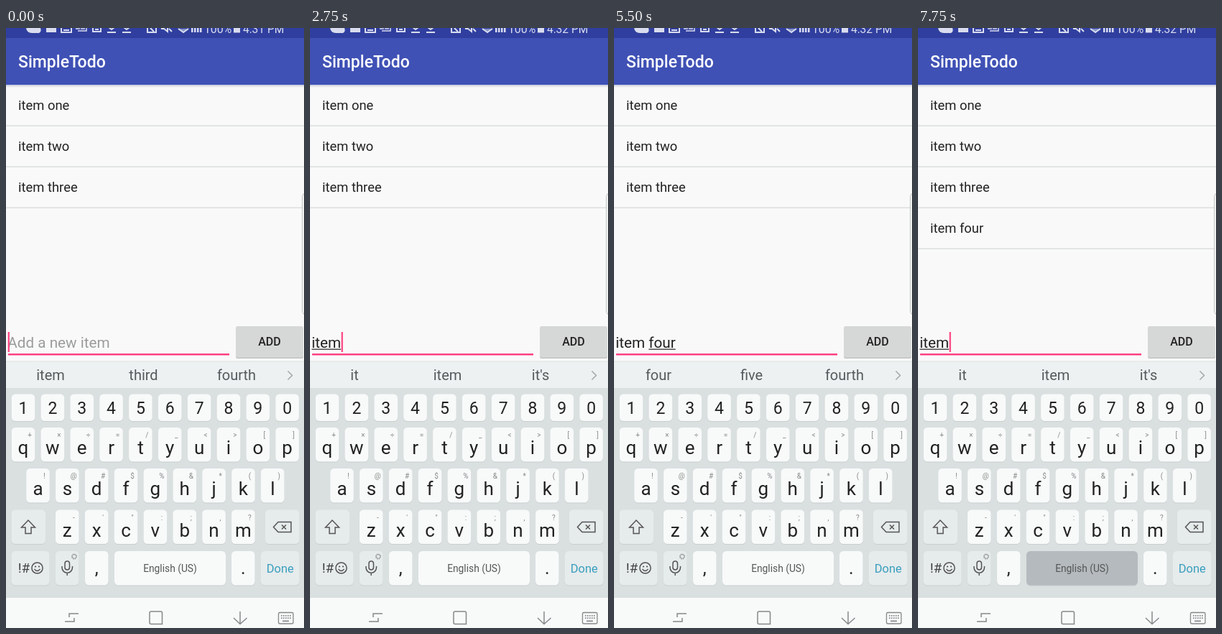
These frames come from a looping animation (415 by 835 pixels, 8 s). An HTML page:

```html
<!DOCTYPE html>
<html lang="en">
<head>
<meta charset="utf-8">
<title>Todo list</title>
<style>
html, body { margin: 0; width: 100%; height: 100%; overflow: hidden; background: #f9f9f9; }
svg { display: block; font-family: Roboto, "Noto Sans", sans-serif; }
text { white-space: pre; }
</style>
</head>
<body>
<svg id="stage" width="415" height="835" viewBox="0 0 415 835"></svg>
<script>
const STEP = 250, LOOP = 8000;
const INK = '#222', PITCH = 40.85;
const FIELD_FONT = 20.7, FIELD_X = 2.3;
const stage = document.getElementById('stage');
const pen = document.createElement('canvas').getContext('2d');

const esc = s => s.replace(/&/g, '&amp;').replace(/</g, '&lt;');
const rect = (x, y, w, h, fill, r = 0, more = '') =>
  `<rect x="${x}" y="${y}" width="${w}" height="${h}" rx="${r}" fill="${fill}" ${more}/>`;
const text = (s, x, y, size, fill = INK, anchor = 'middle', weight = 400) =>
  `<text x="${x}" y="${y}" font-size="${size}" fill="${fill}" text-anchor="${anchor}" font-weight="${weight}">${esc(s)}</text>`;
const line = (d, color, width = 1.5, fill = 'none') =>
  `<path d="${d}" stroke="${color}" stroke-width="${width}" fill="${fill}"/>`;
const circle = (x, y, r, fill, more = '') =>
  `<circle cx="${x}" cy="${y}" r="${r}" fill="${fill}" ${more}/>`;

function fieldWidth(s) {
  pen.font = `${FIELD_FONT}px Roboto, "Noto Sans", sans-serif`;
  return pen.measureText(s).width;
}

// Each entry: [time, properties that change from then on]
const START = 'item third fourth', PREFIX = "it item it's", NUMBERS = 'three four five';
const script = [
  [0, { typed: '', caret: 1, key: '', words: START, clock: '4:31 PM', rows: 3, add: 0 }],
  [250, { caret: 0 }],
  [750, { caret: 1 }],
  [1250, { key: 'i' }],
  [1500, { typed: 'i', key: 't' }],
  [1750, { typed: 'it', key: 'e', words: PREFIX }],
  [2000, { typed: 'ite', key: 'm', clock: '4:32 PM' }],
  [2250, { typed: 'item', key: '' }],
  [3000, { key: ' ' }],
  [3250, { typed: 'item ', key: 'f', words: NUMBERS }],
  [3500, { typed: 'item f', key: 'o' }],
  [3750, { typed: 'item fo', key: '' }],
  [4000, { typed: 'item fou', key: 'r' }],
  [4250, { typed: 'item four', key: '' }],
  [4500, { words: 'four five fourth' }],
  [5000, { caret: 0 }],
  [5750, { add: 1 }],
  [6000, { typed: '', caret: 1, add: 0, rows: 4, words: START }],
  [6500, { key: 'i' }],
  [6750, { typed: 'i', key: 't' }],
  [7000, { typed: 'it', key: 'e', words: PREFIX }],
  [7250, { typed: 'ite', key: 'm' }],
  [7500, { typed: 'item', key: '' }],
  [7750, { key: ' ' }]
];
const stateAt = t => Object.assign({}, ...script.filter(e => e[0] <= t).map(e => e[1]));

function statusBar(clock) {
  const c = '#d9dcee';
  return rect(0, 0, 415, 14, '#303f9f') +
    line('M28 0Q29 7 36 7H46Q50 5 48 0Z', c, 0, c) +
    rect(56, 0, 14, 6, c) +
    line('M77 0V6H91V0M80 3H88', c, 2) +
    line('M97 1H103M100 4H112V0M104 1H110', c, 1.5) +
    line('M121 0V5H132V0M124 2H129', c, 2) +
    [147, 168].map(x => line(`M${x - 4} -1L${x} 2L${x + 4} -1M${x - 6} 6H${x + 6}`, c, 2)).join('') +
    line('M197 0V6H209V0M201 0L206 5', c, 2) +
    line('M216 1H220L225 5V0M227 1L231 5', c, 2) +
    line('M240 1L247 6L254 1', c, 2, '#8790c8') +
    [258, 262, 266, 270].map(x => rect(x, 0, 2.5, 6, c)).join('') +
    text('100%', 295, 6.5, 16, c) + rect(317, 0, 9, 6.5, c) +
    text(clock, 330, 6.5, 15.6, c, 'start');
}

function list(count) {
  return ['one', 'two', 'three', 'four'].slice(0, count).map((n, i) =>
    text('item ' + n, 17, 114 + 57 * i, 18.4, INK, 'start') +
    rect(0, 135.5 + 57 * i, 415, 1.2, '#d5d7d7')).join('');
}

function entry({ typed, caret, add }) {
  const end = FIELD_X + fieldWidth(typed);
  const wordStart = FIELD_X + fieldWidth(typed.slice(0, typed.lastIndexOf(' ') + 1));
  return (typed
      ? text(typed, FIELD_X, 445, FIELD_FONT, INK, 'start')
      : text('Add a new item', FIELD_X, 445, FIELD_FONT, '#9b9c9c', 'start')) +
    rect(wordStart, 446.5, end - wordStart, 1.2, INK) +
    rect(3, 453, 308, 2.5, '#ff4081') +
    (caret ? rect(end + 0.4, 423, 2.2, 28, '#ff4081') : '') +
    rect(320, 416, 94, 44, '#c2c3c3', 2.5) +
    rect(320, 415, 94, 43.5, add ? '#b4b5b5' : '#d6d7d7', 2.5) +
    text('ADD', 367, 442, 16.1, INK, 'middle', 500);
}

const letterRows = [
  ['qwertyuiop', '+×÷=/_<>[]', 24, 556],
  ['asdfghjkl', '!@#$%&*()', 44.5, 613],
  ['zxcvbnm', '-\'":;,?', 85.3, 670.5]
];

function key(x, y, w, h, fill = '#f8fafa') {
  return rect(x, y + 1, w, h, '#c9cecf', 5.5) + rect(x, y, w, h, fill, 5.5);
}

function letters(pressed) {
  let keys = '', popup = '';
  for (const [chars, hints, x0, y] of letterRows)
    [...chars].forEach((ch, i) => {
      const x = x0 + PITCH * i, down = ch === pressed;
      keys += key(x - 16.3, y, 32.6, 47.5, down ? '#b4babd' : undefined) +
        text(ch, x, y + 37, 26) + text(hints[i], x + 9, y + 14, 10, '#888');
      if (down) popup =
        rect(x - 31, y - 94.5, 62, 80, '#cfd4d5', 12) +
        rect(x - 30.2, y - 95, 60.4, 79, '#f9fbfb', 11.5) +
        text(ch, x, y - 39, 41, INK, 'middle', 500);
    });
  return keys + popup;
}

function functionKeys(pressed) {
  const soft = '#e6ebec', c = '#555';
  return key(7.5, 670.5, 47.5, 47.5, soft) +
    line('M31 685L21.5 695H27V703.5H35V695H40.5Z', c) +
    key(361, 670.5, 47.5, 47.5, soft) +
    line('M372.5 694.5L379 687.5H397V701.5H379ZM384 691.5L390 697.5M390 691.5L384 697.5', c) +
    key(7.5, 728, 53, 47.5, soft) + text('!#', 25, 758, 19, '#444') +
    circle(43.5, 751.5, 7.6, 'none', `stroke="${c}" stroke-width="1.5"`) +
    circle(41, 749.5, 1.1, c) + circle(46, 749.5, 1.1, c) + line('M39.5 753Q43.5 758 47.5 753', c, 1.3) +
    key(69, 728, 32.5, 47.5, soft) +
    rect(82, 742, 6.5, 12, 'none', 3.2, `stroke="${c}" stroke-width="1.5"`) +
    line('M78 749V751A7.2 7.2 0 0 0 92.5 751V749M85.2 758V762', c) +
    circle(95, 735.5, 3, 'none', 'stroke="#999" stroke-width="2" stroke-dasharray="1.6 .7"') +
    key(110, 728, 32.5, 47.5) + text(',', 126.3, 760, 25) +
    key(151, 728, 155, 47.5, pressed === ' ' ? '#b4babd' : undefined) +
    text('English (US)', 228.5, 757, 13.8, '#555') +
    key(314, 728, 32.5, 47.5) + text('.', 330.3, 760, 25) +
    key(355, 728, 53.5, 47.5, soft) + text('Done', 381.7, 758, 16.5, '#399fbe');
}

function navBar() {
  const c = '#858989';
  let dots = '';
  for (let i = 0; i < 10; i++) dots += rect(383 + i % 5 * 3, 817 + 3.4 * (i / 5 | 0), 1.7, 1.7, c);
  return rect(0, 793, 415, 42, '#f8f9f9') +
    line('M88 820V815H101M82 826H95V821', c) +
    line('M209 829.5H202Q200 829.5 200 827.5V814Q200 812 202 812H215.5Q217.5 812 217.5 814V829.5H209', c) +
    line('M326 812V829.5M317 821L326 829.5L335.5 821', c) +
    rect(379.5, 813.5, 20.5, 15.5, 'none', 2, `stroke="${c}" stroke-width="1.3"`) +
    dots + rect(385, 824.5, 9, 1.7, c);
}

function keyboard({ words, key: pressed }) {
  return rect(0, 463.5, 415, 38, '#edf1f2') + rect(0, 463.5, 415, 1, '#dfe3e4') +
    words.split(' ').map((w, i) => text(w, 62 + 129.5 * i, 490, 20, '#555b5d')).join('') +
    line('M392.5 477.5L398.5 483.5L392.5 489.5', '#a3a8aa') +
    rect(0, 501, 415, 292, '#dadfe0') +
    [...'1234567890'].map((d, i) => {
      const x = 24 + PITCH * i;
      return key(x - 16.3, 509.5, 32.6, 37.5) + text(d, x, 537, 23);
    }).join('') +
    functionKeys(pressed) + letters(pressed);
}

function draw(s) {
  stage.innerHTML = rect(0, 0, 415, 835, '#f9f9f9') +
    rect(0, 79, 415, 2, '#d3d6e0') + rect(0, 81, 415, 1.5, '#ecedf0') +
    rect(0, 13, 415, 66, '#3f51b5') + statusBar(s.clock) +
    text('SimpleTodo', 17, 55, 23, '#fff', 'start', 500) +
    list(s.rows) +
    rect(412.5, 230.5, 10, 168, '#f1f2f2', 4, 'stroke="#c6c8c8"') +
    entry(s) + navBar() + keyboard(s);
}

let shown = -1;
const began = performance.now();
function tick(now) {
  const step = Math.floor(Math.max(0, now - began) % LOOP / STEP);
  if (step !== shown) draw(stateAt((shown = step) * STEP));
  requestAnimationFrame(tick);
}
tick(began);
</script>
</body>
</html>
```
